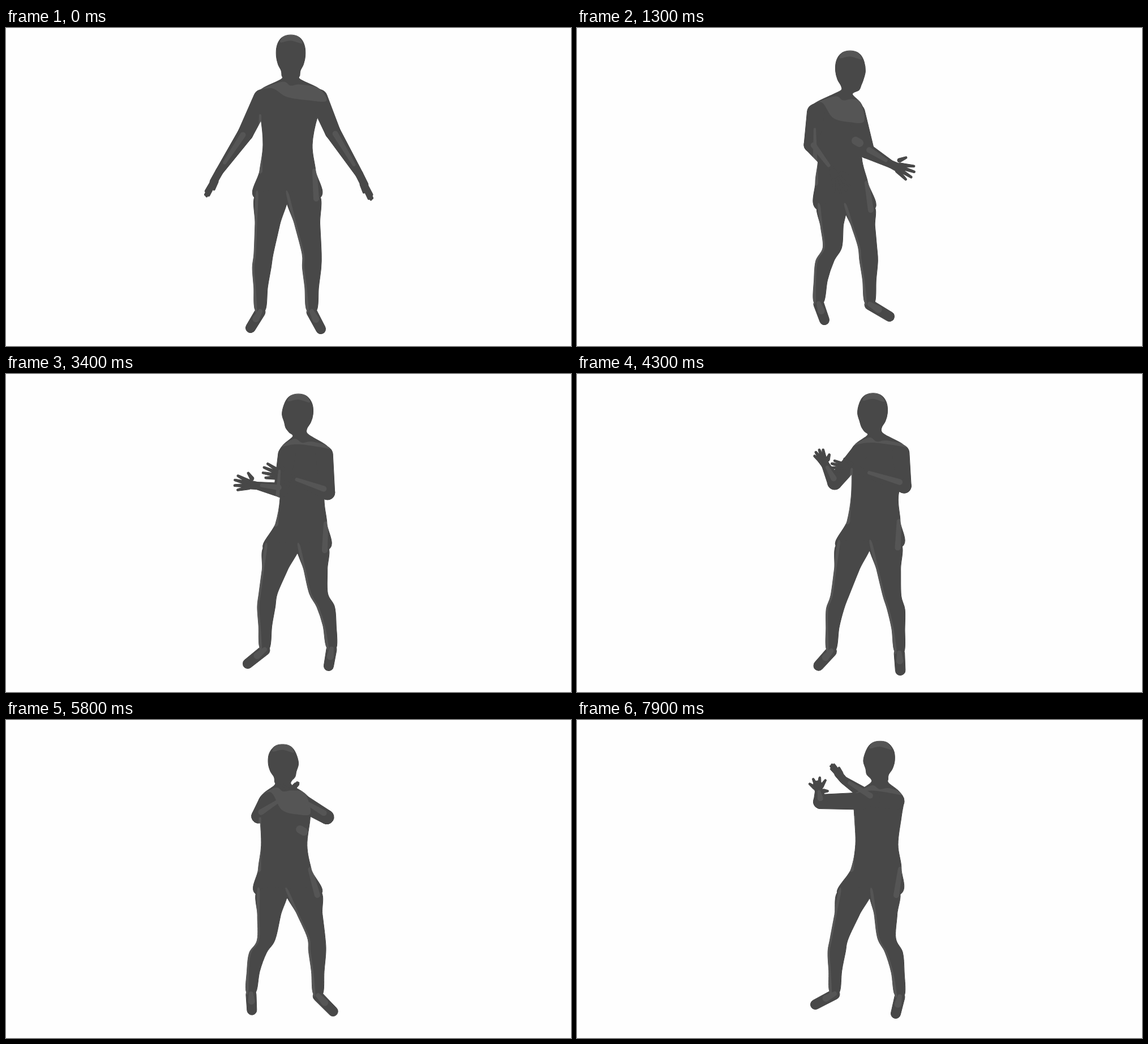
An HTML page with a canvas that plays this animation: 998 by 561 pixels, repeating every 8000 ms.

```html
<!DOCTYPE html>
<html lang="en">
<head>
<meta charset="utf-8">
<title>Moving figure</title>
<style>
html, body { margin: 0; width: 100%; height: 100%; overflow: hidden; background: #fefefe; }
canvas { display: block; }
</style>
</head>
<body>
<canvas id="stage" width="998" height="561"></canvas>
<script>
const g = document.getElementById('stage').getContext('2d');
const LOOP = 8000, STEP = 100;
const DARK = '#3b3b3b', BASE = '#484848', LIGHT = '#555';
const poses = [];

// head: x, top, turn; left, right: torso edges from shoulder to crotch;
// legs: crotch, then knee, ankle, toes of each leg; arms: elbow, wrist, fingertips, finger spread
function pose(time, head, left, right, crotch, legL, legR, armL, armR) {
  poses.push({ time, parts: [head, left, right, crotch, legL, legR, armL, armR] });
}

pose(0, [503, 13, 0], [439, 449, 454, 448, 442], [566, 551, 541, 547, 552], [496, 301],
  [455, 398, 449, 497, 432, 529], [540, 398, 540, 497, 556, 531],
  [423, 186, 377, 253, 354, 294, -.09], [577, 183, 624, 258, 645, 300, .09]);
pose(1300, [482, 41, .2], [408, 420, 426, 421, 426], [507, 510, 503, 514, 523], [473, 321],
  [451, 387, 427, 483, 437, 515], [513, 386, 517, 484, 552, 509],
  [414, 206, 452, 254, 470, 288, -.4], [512, 217, 554, 240, 592, 258, -.35]);
pose(2200, [447, 36, 1], [400, 407, 414, 408, 412], [485, 491, 490, 500, 515], [461, 317],
  [438, 386, 420, 484, 434, 515], [508, 386, 513, 484, 541, 508],
  [425, 195, 495, 168, 539, 152, -.31], [488, 199, 545, 184, 588, 173, -.26]);
pose(3400, [517, 36, -.4], [482, 483, 484, 476, 458], [576, 570, 562, 567, 567], [516, 311],
  [463, 387, 457, 483, 427, 511], [552, 387, 575, 482, 570, 515],
  [486, 205, 443, 197, 405, 192, .35], [568, 209, 500, 183, 456, 170, .29]);
pose(5100, [520, 46, -.1], [478, 480, 478, 472, 461], [580, 572, 561, 564, 566], [513, 302],
  [465, 388, 442, 477, 431, 506], [554, 388, 557, 484, 568, 516],
  [430, 182, 447, 135, 460, 97, .31], [576, 189, 505, 163, 460, 156, .05]);
pose(6600, [454, 40, 1], [413, 416, 423, 418, 427], [492, 500, 501, 514, 541], [477, 317],
  [453, 388, 425, 484, 437, 518], [541, 379, 547, 482, 588, 512],
  [467, 156, 538, 144, 567, 134, -.15], [553, 151, 524, 110, 502, 69, -.35]);
pose(7900, [536, 38, -.5], [489, 490, 492, 484, 463], [577, 573, 567, 573, 568], [519, 309],
  [463, 386, 455, 480, 421, 502], [547, 385, 570, 485, 563, 518],
  [430, 144, 427, 125, 423, 103, .74], [523, 141, 471, 106, 450, 81, .14]);

// head profile: height, half width, extra on the face side, extra on the back
const HEAD = [[0, 7, 3, 0], [6, 17, 4, 0], [18, 23, 6, 2], [34, 24, 12, 2],
  [48, 21, 10, 0], [58, 16, 16, -3], [66, 15, 3, -3]];
// torso levels between head top and crotch
const LEVELS = [.38, .49, .67, .83, 1];
// steps toward the viewer: time, growth
const STEPS = [[500, .01], [1850, .02], [2750, .015], [4500, .055]];

const mix = (a, b, k) => a + (b - a) * k;
const clamp = (x, lo, hi) => Math.max(lo, Math.min(hi, x));

// closed smooth curve through points
function smooth(pts) {
  const p = new Path2D(), n = pts.length, at = i => pts[(i + n) % n];
  p.moveTo(...pts[0]);
  for (let i = 0; i < n; i++) {
    const [a, b, c, d] = [at(i - 1), at(i), at(i + 1), at(i + 2)];
    p.bezierCurveTo(b[0] + (c[0] - a[0]) / 6, b[1] + (c[1] - a[1]) / 6,
      c[0] - (d[0] - b[0]) / 6, c[1] - (d[1] - b[1]) / 6, c[0], c[1]);
  }
  return p;
}

// outline from rows of y, left, right
const outline = rows => smooth([...rows.map(([y, l]) => [l, y]),
  ...[...rows].reverse().map(([y, , r]) => [r, y])]);

// tapered round-ended segment
function capsule(x, y, r, u, v, s) {
  const p = new Path2D(), a = Math.atan2(v - y, u - x), q = Math.PI / 2;
  p.arc(x, y, r, a + q, a - q);
  p.arc(u, v, s, a - q, a + q);
  p.closePath();
  return p;
}

function headRows([x, top, turn], s) {
  const t = Math.abs(turn);
  return HEAD.map(([dy, w, face, back]) => {
    const f = (w + face * t) * s, b = (w + back * t) * s;
    return turn < 0 ? [top + dy * s, x - f, x + b] : [top + dy * s, x - b, x + f];
  });
}

function legRows(outer, [cx, cy], [kx, ky, ax, ay], s) {
  const row = (x, y, r) => [y, x - r * s, x + r * s];
  const knee = row(kx, ky, 16), top = [cy - 8, Math.min(outer, cx), Math.max(outer, cx)];
  return [top, top.map((v, i) => mix(v, knee[i], .5)), knee,
    row(mix(kx, ax, .55), mix(ky, ay, .25), 15.5),
    row(mix(kx, ax, .85), mix(ky, ay, .6), 11.5), row(ax, ay, 8.5)];
}

const foot = ([, , ax, ay, tx, ty]) => capsule(ax, ay + 4, 9, tx, ty, 8.5);

function arm(sx, sy, [ex, ey, wx, wy, tx, ty, spread], s) {
  const dir = Math.atan2(ty - wy, tx - wx), len = Math.hypot(tx - wx, ty - wy);
  const reach = (a, d) => [wx + Math.cos(a) * d, wy + Math.sin(a) * d];
  const finger = (k, size) => {
    const a = dir + k * spread;
    return capsule(...reach(a, len * .4), 3.5, ...reach(a, len * size), 1.8);
  };
  return [capsule(sx, sy, 15 * s, ex, ey, 12.5 * s), capsule(ex, ey, 12.5 * s, wx, wy, 6.5),
    capsule(wx, wy, 6.5, ...reach(dir, len * .45), 6 + 5 * Math.min(.4, Math.abs(spread))),
    finger(1, .98), finger(.35, 1.04), finger(-.35, 1.02), finger(-1, .9), finger(2.4, .7)];
}

function blend(t) {
  let i = 0;
  while (i < poses.length - 2 && t >= poses[i + 1].time) i++;
  const get = j => poses[clamp(j, 0, poses.length - 1)].parts;
  const k = Math.min(1, (t - poses[i].time) / (poses[i + 1].time - poses[i].time));
  const [A, B, C, D] = [get(i - 1), get(i), get(i + 1), get(i + 2)];
  const e = k * k * (3 - 2 * k), m = k * (1 - k) * (1 - k), n = k * k * (k - 1);
  return B.map((part, p) => part.map((b, j) => {
    const c = C[p][j];
    return mix(b, c, e) + .25 * (m * (c - A[p][j]) + n * (D[p][j] - b));
  }));
}

const zoomAt = t => STEPS.reduce((z, [c, grow]) => z + grow * Math.exp(-(((t - c) / 250) ** 2)), 1);

function draw(t) {
  const [head, left, right, crotch, legL, legR, armL, armR] = blend(t);
  const z = zoomAt(t), top = head[1], height = crotch[1] - top, s = height / 270;
  const ys = LEVELS.map(k => top + height * k);
  const [sl] = left, [sr] = right, [sy] = ys;
  const nx = mix(head[0], (sl + sr) / 2, .5), ny = top + height * .27;
  const nl = nx - 16 * s, nr = nx + 16 * s, trapY = top + height * .325;
  const trapL = mix(nl, sl, .7), trapR = mix(nr, sr, .7);

  const body = [...headRows(head, s), [ny, nl, nr], [trapY, trapL, trapR],
    ...ys.map((y, i) => [y, left[i], right[i]])];
  const legs = [legRows(left[4], crotch, legL, s), legRows(right[4], crotch, legR, s)];
  const shapes = [outline(body), ...legs.map(outline), foot(legL), foot(legR),
    ...arm(sl + 14, sy + 2, armL, s), ...arm(sr - 14, sy + 2, armR, s)];

  g.setTransform(1, 0, 0, 1, 0, 0);
  g.clearRect(0, 0, 998, 561);
  g.setTransform(z, 0, 0, z, 499 * (1 - z), 280 * (1 - z));
  g.strokeStyle = DARK;
  g.fillStyle = BASE;
  shapes.forEach(p => g.stroke(p));
  shapes.forEach(p => g.fill(p));

  // lighter patches stay inside the silhouette
  g.globalCompositeOperation = 'source-atop';
  g.fillStyle = LIGHT;
  const [y, l, r] = body[1], mid = (l + r) / 2;
  g.fill(smooth([[l, y + 6], [l + 5, y - 4], [mid, y - 9], [r - 4, y - 3], [r + 2, y + 8], [mid, y + 3]]));

  const facing = clamp(.5 + head[2] * 2, 0, 1), w = sr - sl;
  g.fill(smooth([[nl + 3, ny + 4], [trapL, trapY], [sl + 4, sy - 12], [sl + w * .25, sy - 16],
    [sl + w * .45, sy - 16 + 30 * facing], [sl + w * .75, sy - 12 + 34 * facing],
    [sr, sy - 8 + 28 * facing], [trapR, trapY], [nr, ny + 9], [nx, ny + 11]]));
  g.fill(capsule(left[1], ys[1], 2, left[3], ys[3], 5));
  g.fill(capsule(right[3] - 2, ys[3], 4, right[4] - 4, ys[4], 5));
  if (facing > .8) {
    const by = mix(ys[1], ys[2], .45);
    g.fill(capsule(right[1] - 18, by - 2, 7, right[1] - 11, by + 2, 7));
  }
  for (const leg of legs) {
    g.fill(smooth([...leg.map(([y, x]) => [x - 1, y]), ...[...leg].reverse().map(([y, x]) => [x + 3.5, y])]));
  }
  for (const [, , ax, ay, tx, ty] of [legL, legR]) {
    g.fill(capsule(ax, ay + 3, 4, mix(ax, tx, .45), mix(ay, ty, .5), 6));
  }
  for (const [ex, ey, wx, wy] of [armL, armR]) {
    g.fill(capsule(mix(ex, wx, .1), mix(ey, wy, .1) - 4, 5, mix(ex, wx, .8), mix(ey, wy, .8) - 2, 3));
  }
  g.globalCompositeOperation = 'source-over';
}

function tick() {
  draw(Math.floor(performance.now() % LOOP / STEP) * STEP);
  requestAnimationFrame(tick);
}
tick();
</script>
</body>
</html>
```
